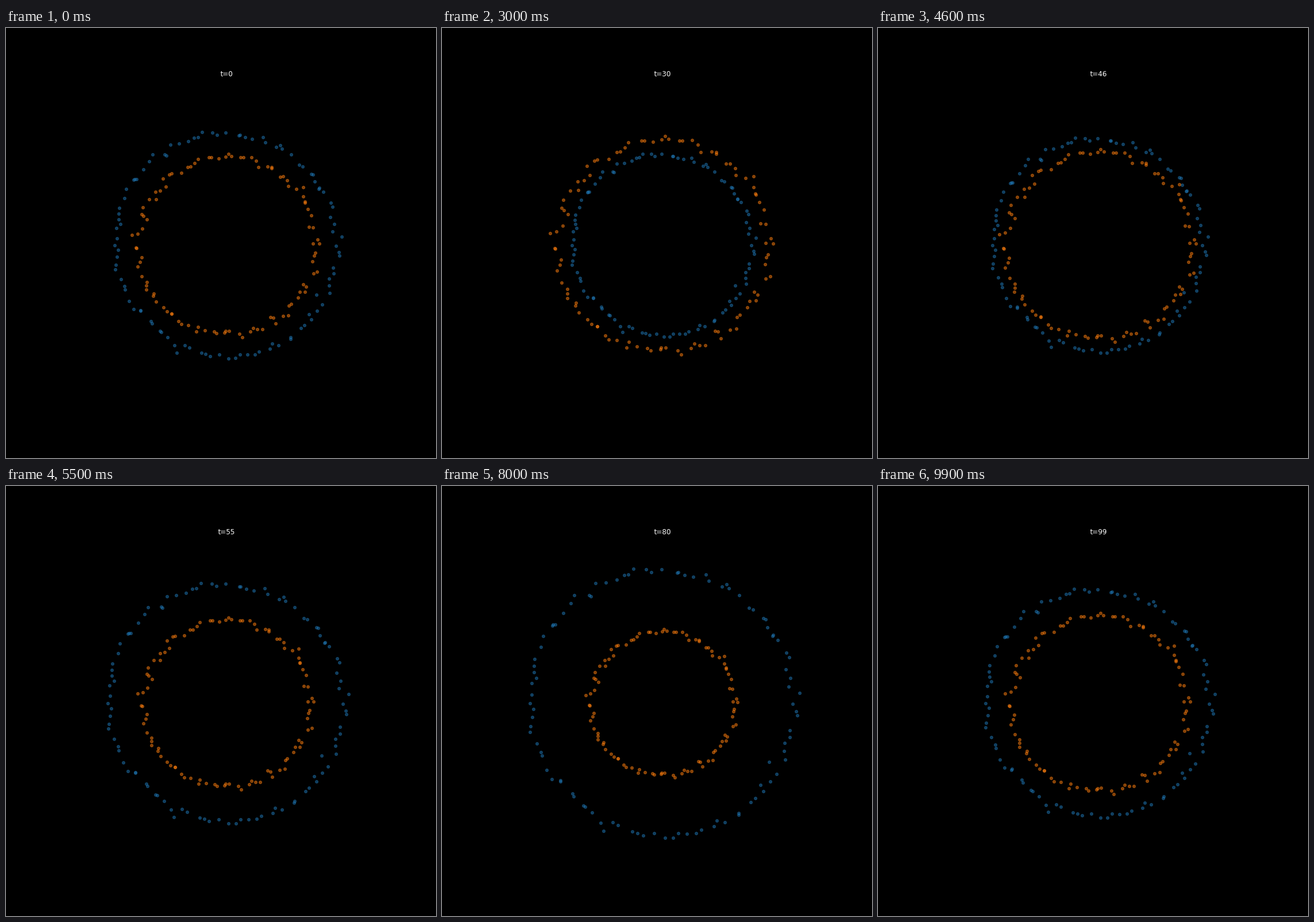
Write a matplotlib script that moves like this. It is 748 px wide and 748 px high and loops after 10000 ms.

```python
import numpy as np
import matplotlib.pyplot as plt
from matplotlib.animation import FuncAnimation

SIZE, DPI = 748, 72
FRAMES, INTERVAL = 100, 100
DOTS = 100
RADIUS, FACTOR, NOISE = 193.5, 0.8, 4.5  # pixels, inner/outer ratio, pixels
SWING = 0.2

rng = np.random.default_rng(4)


def make_ring(radius):
    """Evenly spaced dots on a circle, each shifted by seeded noise."""
    angle = np.linspace(0, 2 * np.pi, DOTS, endpoint=False)
    circle = radius * np.column_stack([np.cos(angle), np.sin(angle)])
    return circle + rng.normal(0, NOISE, circle.shape)


fig, ax = plt.subplots(figsize=(SIZE / DPI, SIZE / DPI), dpi=DPI,
                       facecolor="black")
box = ax.get_position()
ax.set_xlim(-box.width * SIZE / 2, box.width * SIZE / 2)
ax.set_ylim(-box.height * SIZE / 2, box.height * SIZE / 2)
ax.axis("off")
title = ax.set_title("t=0", color="white", fontsize=12)

rings = []
for radius, color, sign in [(RADIUS, "tab:blue", -1),
                            (RADIUS * FACTOR, "tab:orange", 1)]:
    points = make_ring(radius)
    dots, = ax.plot(*points.T, "o", markersize=5, color=color, alpha=0.5)
    rings.append((dots, points, sign))


def update(t):
    wave = SWING * np.sin(2 * np.pi * t / FRAMES)
    for dots, points, sign in rings:
        dots.set_data(*(points * (1 + sign * wave)).T)
    title.set_text(f"t={t}")
    return [title] + [ring[0] for ring in rings]


anim = FuncAnimation(fig, update, frames=FRAMES, interval=INTERVAL,
                     repeat=True, repeat_delay=0)
plt.show()
```
